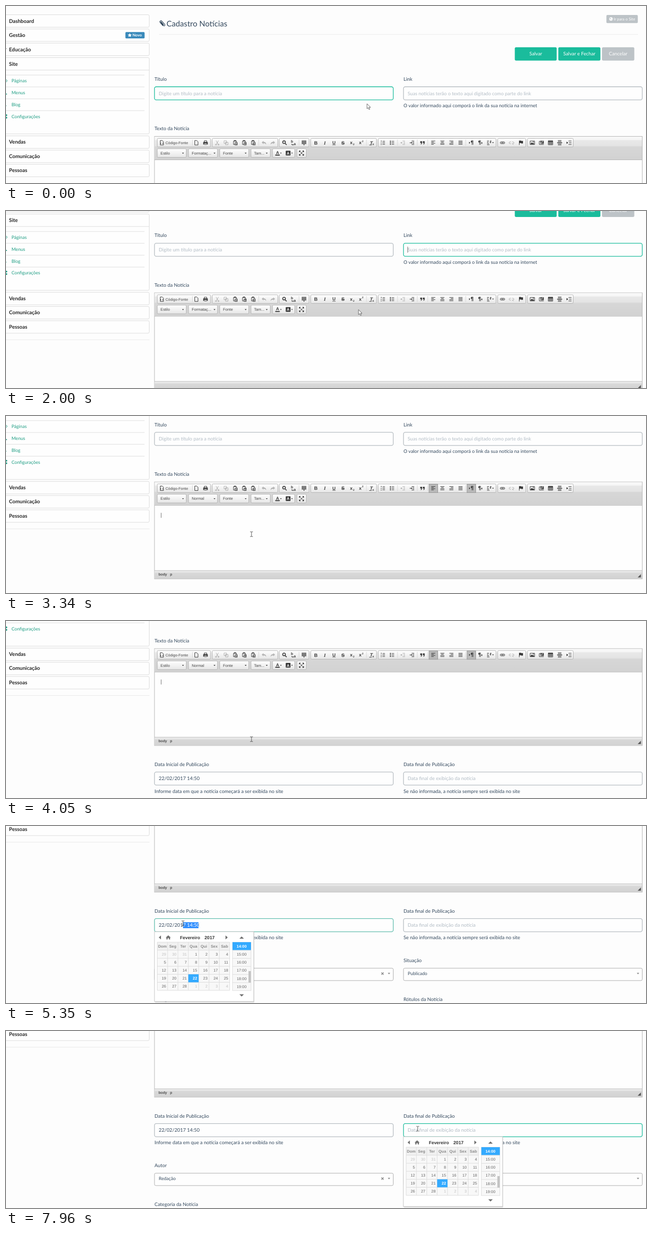
An HTML page that plays this animation: 1280 px wide and 355 px high, repeating every 8 s.

```html
<!DOCTYPE html>
<html lang="pt-BR">
<head>
<meta charset="utf-8">
<title>Cadastro Notícias</title>
<style>
  html, body { margin: 0; width: 100%; height: 100%; overflow: hidden; background: #fdfdfd; }
  svg { display: block; width: 1280px; height: 355px; }
  text { font-family: Lato, sans-serif; text-rendering: geometricPrecision; white-space: pre; }
  .ui { font-family: "Liberation Sans", Arial, sans-serif; }
  .b { font-weight: 700; }
  .ic { fill: none; stroke: #3a3a3a; stroke-width: 1; }
  .heavy { stroke-width: 1.6; }
  .off { opacity: .35; }
</style>
</head>
<body>
<svg id="stage" viewBox="0 0 1280 355" xmlns="http://www.w3.org/2000/svg"></svg>
<script>
const LOOP = 8000, INK = '#34495e', GREEN = '#1abc9c', GREY = '#bdc3c7', SCROLL_END = 323.3;

// ---------- drawing helpers ----------
const rect = (x, y, x2, y2, fill, more = '') =>
  `<rect x="${x}" y="${y}" width="${x2 - x}" height="${y2 - y}" fill="${fill}" ${more}/>`;
const path = (d, more = '') => `<path d="${d}" ${more}/>`;
const line = (x, y, x2, y2, color) => path(`M${x} ${y}L${x2} ${y2}`, `fill="none" stroke="${color}"`);
// y is the middle of the capitals
const text = (x, y, s, size = 9.75, fill = INK, more = '') =>
  `<text x="${x}" y="${y + size * .355}" font-size="${size}" fill="${fill}" ${more}>${s}</text>`;
const mid = 'text-anchor="middle"';
const group = (body, more = '') => `<g ${more}>${body}</g>`;
const tri = (x, y, w, h, fill) => path(`M${x - w} ${y - h}h${2 * w}l${-w} ${2 * h}z`, `fill="${fill}"`);

// ---------- sidebar ----------
function sidebar() {
  let s = '';
  const panel = (y, y2) => rect(-10, y, 286.5, y2, '#fefefe', 'rx="2.5" stroke="#dcdcdc"');
  const head = (y, label) => text(6, y, label, 10.35, '#262626', 'class="b"');
  ['Dashboard', 'Gestão', 'Educação'].forEach((l, i) => {
    s += panel(17.5 + i * 28.5, 42.5 + i * 28.5) + head(30 + i * 28.6, l);
  });
  s += rect(238.8, 52.2, 277.2, 65, '#3a8abb', 'rx="1.8"')
    + path('M247.5 54.4l1.2 2.7 2.9.3-2.2 1.9.7 2.9-2.6-1.5-2.6 1.5.7-2.9-2.2-1.9 2.9-.3z', 'fill="#fff"')
    + text(253, 58.7, 'Novo', 7.76, '#fff', 'class="b"');
  s += panel(103.5, 256.5) + line(0, 128.5, 286, 128.5, '#dcdcdc') + head(116, 'Site');
  ['Páginas', 'Menus', 'Blog', 'Configurações'].forEach((l, i) => {
    s += line(0, 138.5 + i * 23.8, 277, 138.5 + i * 23.8, '#dedede')
      + text(11, 150.2 + i * 23.8, l, 9.15, '#1c9c82');
  });
  s += path('M0 147.5l2.6 2.5L0 152.5M0 175.5l2 1.5H0M0 200h1', 'fill="none" stroke="#1c9c82"')
    + '<g fill="#1c9c82"><circle cx=".8" cy="219" r="1.7"/><circle cx=".8" cy="224" r="1.7"/></g>'
    + line(0, 86, 1, 85, '#555');
  ['Vendas', 'Comunicação', 'Pessoas'].forEach((l, i) => {
    s += panel(260.5 + i * 28.5, 285.5 + i * 28.5) + head(272.5 + i * 28.5, l);
  });
  return s + line(0, 355.7, 287, 355.7, '#e8e8e8');
}

// ---------- page header and form ----------
function header() {
  const button = (x, x2, label, fill) =>
    rect(x, 82.7, x2, 109.4, fill, 'rx="2.6"') + text((x + x2) / 2, 96, label, 9.75, '#fff', mid);
  return path('M309.5 33l5.2 6.2c1.6 1.7 4.2-.3 2.8-2.3l-5.7-6.6c-2-2-5.2.4-3.7 2.7l5.4 6.3M310 31.5l5 6',
      `fill="none" stroke="${INK}" stroke-width="1.2" stroke-linecap="round"`)
    + text(321, 35.2, 'Cadastro Notícias', 15.7)
    + line(306, 57, 1264, 57, '#ececec')
    + rect(1200.8, 18, 1263.6, 34.3, GREY, 'rx="2"')
    + '<circle cx="1210" cy="26" r="3.5" fill="#fff"/>'
    + path('M1207.5 25l2-1 .5 1.5-1 1.5zM1211 26.5l1.5-.5-.5 2z', `fill="${GREY}"`)
    + text(1215.3, 26.2, 'Ir para o Site', 7.8, '#fff')
    + button(1017.6, 1101.4, 'Salvar', GREEN) + button(1104.6, 1188.8, 'Salvar e Fechar', GREEN)
    + button(1192, 1256.6, 'Cancelar', GREY);
}

const field = (id, x, y, h = 26.4) =>
  rect(x, y, x + 477.5, y + h, '#fefefe', `id="${id}" rx="3.6" stroke="#b5bcc1" stroke-width="1.3"`);
const hint = (x, y, s, size) => text(x, y, s, size, '#b2bcc5');
const L = 297, R = 795;

function form() {
  const select = (x, label) =>
    rect(x, 608.5, x + 477.5, 633.3, '#fefefe', 'rx="2.6" stroke="#adadad"')
    + text(x + 8.5, 619, label, 9.1) + tri(x + 469, 619.3, 2.4, 1.4, '#888');
  return text(L, 146.5, 'Título') + field('title', L, 162)
    + hint(305.5, 175.2, 'Digite um título para a notícia')
    + text(R, 146.5, 'Link') + field('link', R, 162)
    + hint(803.3, 175.2, 'Suas notícias terão o texto aqui digitado como parte do link', 9.52)
    + text(R, 200, 'O valor informado aqui comporá o link da sua notícia na internet', 9.52)
    + text(L, 246, 'Texto da Notícia')
    + text(L, 494, 'Data Inicial de Publicação') + field('start', L, 509)
    + text(305.5, 522.1, '22/02/2017 14:50')
    + text(L, 547.3, 'Informe data em que a notícia começará a ser exibida no site')
    + text(R, 494, 'Data final de Publicação') + field('end', R, 509)
    + hint(803.3, 522.1, 'Data final de exibição da notícia')
    + text(R, 547.3, 'Se não informada, a notícia sempre será exibida no site')
    + text(L, 593, 'Autor') + select(L, 'Redação')
    + path('M750.7 617l4.6 4.6m0-4.6l-4.6 4.6', 'stroke="#888" stroke-width="1.5"')
    + text(R, 593, 'Situação') + select(R, 'Publicado')
    + text(L, 671.2, 'Categoria da Notícia') + text(R, 671.2, 'Rótulos da Notícia');
}

// ---------- rich text editor ----------
function editor() {
  const edge = 'stroke="#b6b6b6"', face = 'url(#face)', dark = '#3a3a3a';
  let s = rect(297, 261.5, 1272.5, 456, '#fefefe', edge)
    + rect(297.5, 262, 1272, 308, 'url(#bar)') + line(297, 308.5, 1272.5, 308.5, '#b6b6b6')
    + rect(297.5, 440, 1272, 455.5, 'url(#foot)') + line(297, 439.3, 1272.5, 439.3, '#b6b6b6')
    + path('M1269.8 446.5v6.5h-6.5z', 'fill="#555"');
  const box = (x, x2, y) => rect(x, y, x2, y + 17.3, face, 'rx="2" stroke="#b0b0b0" stroke-width=".9"');
  [[302.5, 409], [412.5, 543.5], [546.5, 606], [609.5, 741], [744.5, 980], [983.5, 1039.5], [1043, 1134.5]]
    .forEach(g => s += box(...g, 265.5));
  [[302.5, 360.5], [365, 423], [427.5, 485.5], [490, 528.5], [533, 577.5], [582, 600.5]]
    .forEach(g => s += box(...g, 286.3));
  [373, 505.5, 586, 721, 783, 822.5, 843.5, 919.5].forEach(x => s += line(x, 268, x, 280, '#d8d8d8'));
  const press = x => rect(x, 266, x + 17.5, 283, '#b9b9b9', 'stroke="#8a8a8a" stroke-width=".8"');
  s += group(press(846) + press(922), 'id="pressed"');

  // stroked icon around (x, y); the optional second path is filled
  const icon = (x, d, solid = '', cls = '', y = 274.3) =>
    group(path(d) + (solid && path(solid, `fill="${dark}" stroke="none"`)),
      `class="ic ${cls}" transform="translate(${x} ${y})"`);
  const glyph = (x, c, more = '', size = 9.6, y = 274.3) =>
    text(x, y, c, size, dark, `class="ui b" ${mid} ${more}`);
  const sheet = 'M-3-4.5h4l2.5 2.5v6.5h-6.5z';
  const clip = 'M-3.5-3.5h6v3M-3.5-3.5v7h3M-.5-.5h4.5v5h-4.5z';
  const clipTop = 'M-2.5-5h4v2h-4z';
  const rows = 'M-4-3.5h8M-4 3.2h';
  const listing = 'M-1-3h5M-1 0h5M-1 3h5';
  const indent = 'M-1-3.5h5M1-1.2h3M1 1.2h3M-1 3.5h5M-5 0h4';
  const pilcrow = 'M0-4h4M1.5-4v8M3.5-4v8';
  s += icon(311.5, sheet + 'M-1.5 0l-1 1.3 1 1.3M1.5 0l1 1.3-1 1.3')
    + text(319, 274.5, 'Código-Fonte', 7.45, '#474747', 'class="ui"')
    + icon(380.5, sheet)
    + icon(399, 'M-2.5-4h5v3M-2.5-4v3M-2.5 3.5h5', 'M-4.5-1.5h9v5h-2v-2h-5v2h-2z')
    + icon(422.5, 'M-2.5-4.5l4 7M2.5-4.5l-4 7M-3.5 3a1.2 1.2 0 1 0 2 0zM1.5 3a1.2 1.2 0 1 0 2 0z', '', 'off')
    + icon(440, 'M-4-4h5v5h-5zM-1-1h5v5h-5z', '', 'off')
    + icon(458.5, clip + 'M1 1.5h2M1 3h2', clipTop)
    + icon(476.5, clip + 'M.5 1h3M2 1v3', clipTop)
    + icon(494.5, clip + 'M.5 1l1 2.5 1-2.5', clipTop)
    + icon(516, '', 'M-4.5-.5l3.5-3.2v2q5 0 5.5 5.200-2-2.800-5.5-2.800v2z', 'off')
    + icon(533.5, '', 'M4.5-.5l-3.5-3.2v2q-5 0-5.500 5.200 2-2.800 5.500-2.800v2z', 'off')
    + icon(557, 'M1.8-1.2a2.7 2.7 0 1 0-5.4 0a2.7 2.7 0 1 0 5.4 0M1 1l3.3 3.3', '', 'heavy')
    + glyph(572, 'b', '', 7.2, 271.8) + glyph(577.5, 'a', '', 7.2, 276.6)
    + icon(575, 'M-3.5 2.2v1.8h2.5', 'M-1.3 2.4l1.8 1.6-1.8 1.6z')
    + icon(596, 'M-4.5-4h9M-4.5-2h9M-4.5 0h9M-4.5 2h9M-1 4h2M-3.5-4v6M0-4v9M3.5-4v6')
    + glyph(619.7, 'B') + glyph(637.7, 'I', 'font-style="italic" style="font-family:Liberation Serif,serif"')
    + glyph(656, 'U', 'text-decoration="underline"', 8.8, 273.8) + glyph(674, 'S', 'text-decoration="line-through"')
    + glyph(690.5, 'x', '', 9) + glyph(695.3, '2', '', 5, 277.5)
    + glyph(708.5, 'x', '', 9) + glyph(713.3, '2', '', 5, 271)
    + glyph(730.5, 'T', 'font-style="italic"', 9.4) + glyph(734.5, 'x', '', 6, 277)
    + icon(730, 'M-3.5 4.5h5')
    + icon(754, listing + 'M-3.5-4.5v2.5M-4.5.5h2M-4.5 3.5h2')
    + icon(772.3, listing, 'M-4.5-4h2v2h-2zM-4.5-1h2v2h-2zM-4.5 2h2v2h-2z')
    + icon(794, indent, 'M-5 0l2.5-2v4z', 'off')
    + icon(812.3, indent, 'M.5 0l-2.5-2v4z')
    + icon(833, '', 'M-4.5-3h3.7v3.5q0 2.5-2.7 3v-1q1.2-.7 1.2-2h-2.2zM.7-3h3.7v3.5q0 2.5-2.7 3v-1q1.2-.7 1.2-2h-2.2z')
    + icon(854.5, rows + '5M-4-1.3h5M-4 .9h8')
    + icon(872.7, rows + '8M-2.5-1.3h5M-4 .9h8')
    + icon(890.7, rows + '8M-1-1.3h5M-4 .9h8')
    + icon(909, rows + '8M-4-1.3h8M-4 .9h8')
    + icon(930.5, pilcrow, 'M-4.5-2l2.5 2-2.5 2zM2-4.3h-1q-2 .3-2 2t2 2h1z')
    + icon(947.5, 'M-2-4h4M-.5-4v8M1.5-4v8', 'M5-1.5l-2.5 2 2.5 2zM0-4.3h-1q-2 .3-2 2t2 2h1z')
    + icon(966, 'M-4-3.5h4M-4-1h3M-4 1.5h4M-4 4h5M2-3.5h3M1.5-1h3M3-4v5')
    + tri(974, 274.3, 1.8, 1, dark)
    + icon(993, 'M0-1.8h-2.7a1.8 1.8 0 0 0 0 3.6h2.7M0-1.8h2.7a1.8 1.8 0 0 1 0 3.6h-2.7M-2.5 0h5')
    + icon(1011, 'M-1-1.8h-2a1.8 1.8 0 0 0 0 3.6h2M1-1.8h2a1.8 1.8 0 0 1 0 3.6h-2M2 2l2 2', '', 'off')
    + icon(1030, 'M-3.5-4.5v9', 'M-3-4q2-1 3.5 0t3.5 0v5q-2 1-3.5 0t-3.5 0z')
    + icon(1052.7, 'M-4.5-3.5h9v7h-9z', 'M-4 3l2.5-4 2 2 1.5-1 2 3zM1-2.5h2v1.5h-2z')
    + icon(1071, 'M-4.5-3h4M-4.5 3.5h9M-4.5-3v6', 'M-2-4h6.5v6h-6.5z')
    + path('M1074 271.5h-2q-1 0-1 4.5m0-2.3h2', 'fill="none" stroke="#eee" stroke-width=".9"')
    + icon(1089, 'M-4.5-4h9v8h-9zM-4.5-1h9M-4.5 1.5h9M-1.5-3v7M1.5-3v7', 'M-4.5-4h9v2h-9z')
    + icon(1107.3, 'M-3.5-4.5h7M-3.5-2.5h7M-3.5 2.5h7M-3.5 4.5h7', 'M-5-.8h10v1.6h-10z')
    + icon(1126, 'M-1-3.5h6M-1 3.5h6M0 0h5', 'M-5-2.3l3.5 2.3-3.5 2.3z');
  [[309, 'Estilo', 354], [371.5, 'Formataç...', 417], [434, 'Fonte', 479.3], [496, 'Tam...', 521.5]]
    .forEach(([x, l, a], i) => s += text(x, 295, l, 7.7, '#474747', `class="ui" ${i == 1 ? 'id="format"' : ''}`)
      + tri(a, 295.3, 1.9, 1.1, dark));
  s += glyph(543, 'A', '', 8.6, 293.8) + rect(538.5, 298, 547.5, 300, dark) + tri(549.8, 295.3, 1.6, 1, dark)
    + rect(559.5, 290.3, 569, 299.8, dark, 'rx="1"') + text(564.3, 295, 'A', 7.6, '#fff', `class="ui b" ${mid}`)
    + tri(572, 295.3, 1.6, 1, dark)
    + icon(591, 'M-3.5-3.5l7 7M3.5-3.5l-7 7', 'M-5-5h3.8l-3.8 3.8zM5-5v3.8l-3.8-3.8zM5 5h-3.8l3.8-3.8zM-5 5v-3.8l3.8 3.8z', '', 295);
  return s + group(text(305, 447, 'body', 7.1, '#4c4c4c', 'class="ui b"')
    + text(328, 447, 'p', 7.1, '#4c4c4c', 'class="ui b"'), 'id="crumbs"');
}

// ---------- date picker ----------
function calendar() {
  const x0 = 302.5, w = 20.7, y0 = 233, h = 16.1, grid = '#dddddd', blue = '#33aaff', arrow = '#707070';
  const ui = 'class="ui"', bold = 'class="ui b"';
  let s = rect(298, 213, 496.5, 354, '#000', 'opacity=".13" rx="1"')
    + rect(297, 212, 495.5, 352, '#fff', 'stroke="#c4c4c4"')
    + path('M310 219.5v8l-4.5-4zM439 219.5v8l4.5-4z', `fill="${arrow}"`)
    + path('M324.5 219.3l5 4.5h-1.3v3.7h-2.5v-2.7h-2.4v2.7h-2.5v-3.7h-1.3z', `fill="${arrow}"`)
    + text(348, 223.5, 'Fevereiro', 8.95, '#333', bold) + text(397, 223.5, '2017', 9.2, '#333', bold)
    + rect(x0, y0, x0 + 7 * w, y0 + 6 * h, '#f8f8f8') + rect(x0, y0, x0 + 7 * w, y0 + h, '#f1f1f1');
  for (let i = 0; i <= 7; i++) {
    s += line(x0 + i * w, y0, x0 + i * w, y0 + 6 * h, grid);
    if (i < 7) s += line(x0, y0 + i * h, x0 + 7 * w, y0 + i * h, grid);
  }
  s += rect(x0 + 3 * w, y0 + 4 * h, x0 + 4 * w, y0 + 5 * h, blue);
  'Dom Seg Ter Qua Qui Sex Sab'.split(' ').forEach((d, i) =>
    s += text(x0 + (i + .5) * w, y0 + h / 2, d, 7.8, '#8a8a8a', `${bold} ${mid}`));
  for (let i = 0; i < 35; i++) {
    const day = i < 3 ? 29 + i : i < 31 ? i - 2 : i - 30, now = i == 24;
    s += text(x0 + (i % 7 + 1) * w - 3, y0 + (Math.floor(i / 7) + 1.5) * h, day, 7.8,
      now ? '#fff' : i < 3 || i > 30 ? '#c2c2c2' : '#666', `class="ui ${now ? 'b' : ''}" text-anchor="end"`);
  }
  s += rect(453, y0, 490, 330, '#f8f8f8', `stroke="${grid}"`) + rect(453, y0, 490, y0 + h, blue);
  for (let i = 0; i < 6; i++) {
    s += text(471.3, y0 + 8 + i * 16.2, 14 + i + ':00', 7.8, i ? '#666' : '#fff', `${i ? ui : bold} ${mid}`);
    if (i) s += line(453, y0 + i * 16.2, 490, y0 + i * 16.2, grid);
  }
  return s + rect(485, 291, 489.8, 314, '#c4c4c4')
    + tri(471.3, 223.8, 4.5, -2.2, arrow) + tri(471.3, 339.7, 4.5, 2.2, arrow);
}

// ---------- assemble ----------
const grad = (id, ...stops) => `<linearGradient id="${id}" x2="0" y2="1">`
  + stops.map(([o, c]) => `<stop offset="${o}" stop-color="${c}"/>`).join('') + '</linearGradient>';
const caret = (id, x, y, y2) => rect(x, y, x + 1, y2, '#707070', `id="${id}"`);
const selection = group(rect(305, 193, 385, 205, '#3390ff')
  + text(305.5, 198.8, '22/02/2017 14:50', 9.75, '#fff'), 'id="selection" clip-path="url(#drag)"');

document.getElementById('stage').innerHTML = '<defs>'
  + grad('bar', [0, '#f9f9f9'], [.13, '#f6f6f6'], [.17, '#e8e8e8'], [.4, '#e4e4e4'], [.44, '#d7d7d7'], [1, '#d2d2d2'])
  + grad('foot', [0, '#ececec'], [.22, '#e4e4e4'], [.26, '#d8d8d8'], [1, '#d3d3d3'])
  + grad('face', [0, '#ffffff'], [1, '#e6e6e6'])
  + '<clipPath id="drag"><rect id="dragBox" y="190" width="90" height="20"/></clipPath></defs>'
  + group(sidebar() + header() + form() + editor()
    + caret('linkCaret', 803, 169, 181) + caret('textCaret', 309.8, 323.5, 333.5)
    + caret('endCaret', 803, 516.3, 528.5), 'id="page"')
  + selection + group(calendar(), 'id="calendar"')
  + path('M0 0v10l2.3-2.1 1.7 3.8 1.7-.8-1.7-3.6h3.1z', 'id="arrow" fill="#fff" stroke="#444" stroke-width=".8"')
  + path('M-2.8-4.8h2l.8.6.8-.6h2M-2.8 4.8h2l.8-.6.8.6h2M0-4.2v8.4',
    'id="beam" fill="none" stroke="#444" stroke-width=".9"');

const $ = Object.fromEntries([...document.querySelectorAll('[id]')].map(e => [e.id, e]));

const bursts = [[0, 0, 1], [120, 830, 6], [1100, 1100, 1], [1540, 1690, 2], [1840, 2140, 3], [2270, 2550, 3],
  [2670, 3340, 6], [3610, 3610, 1], [4050, 4340, 3], [4480, 5050, 5], [5200, 5480, 3], [5910, 6040, 2],
  [6310, 6310, 1], [6590, 6840, 3], [6980, 7550, 5], [7680, 7680, 1], [7960, 7960, 1]];
const ticks = bursts.flatMap(([a, b, n]) =>
  Array.from({ length: n }, (_, i) => n > 1 ? a + (b - a) * i / (n - 1) : a));
const snap = t => ticks.filter(k => k <= t + 4).pop();

// pointer path: time, x, y, text beam
const route = [[0, 722, 196, 0], [60, 722, 196, 0], [420, 796, 180, 1], [560, 822, 176, 1], [830, 826, 177, 1],
  [1480, 826, 177, 1], [1530, 795, 183, 0], [1690, 705, 197.8, 0], [2200, 705, 197.8, 0], [2420, 690, 202, 1],
  [3000, 491, 237, 1], [4420, 491, 237, 1], [5050, 408, 196, 1], [5200, 400, 195, 1], [5480, 308, 195, 1],
  [5850, 308, 195, 1], [6040, 284, 192, 1], [6300, 281.5, 187, 0], [6500, 281.5, 187, 0], [6580, 305, 195, 1],
  [6840, 639, 203.5, 1], [7120, 760, 203, 1], [7410, 823.5, 196, 1], [LOOP, 823.5, 196, 1]];
const CLICK = { link: 570, text: 3080, start: 5200, end: 7430 };

const clamp = v => Math.max(0, Math.min(1, v));
const ease = (t, a, b) => { const p = clamp((t - a) / (b - a)); return p * p * (3 - 2 * p); };
const show = (el, on) => el.setAttribute('visibility', on ? 'visible' : 'hidden');
const within = (t, ...spans) => spans.some(([a, b]) => t >= a && t < b);

function focus(el, t, from, to) {
  const k = clamp((t - from) / 250) - clamp((t - to) / 250);
  const mix = (a, b) => Math.round(a + (b - a) * k);
  el.setAttribute('stroke', `rgb(${mix(181, 26)},${mix(188, 188)},${mix(193, 156)})`);
}

function pointer(t) {
  const i = Math.max(1, route.findIndex(k => k[0] > t)), a = route[i - 1], b = route[i];
  const p = (t - a[0]) / (b[0] - a[0]);
  return { x: a[1] + (b[1] - a[1]) * p, y: a[2] + (b[2] - a[2]) * p, beam: a[3] };
}

function draw(t) {
  const scroll = 129.3 * ease(t, 1760, 2100) + (SCROLL_END - 129.3) * ease(t, 3951, 4181);
  $.page.setAttribute('transform', `translate(0 ${-scroll})`);

  focus($.title, t, -250, CLICK.link);
  focus($.link, t, CLICK.link, CLICK.text);
  focus($.start, t, CLICK.start, CLICK.end);
  focus($.end, t, CLICK.end, 2 * LOOP);
  show($.linkCaret, within(t, [CLICK.link, 1095], [1535, 2110], [2640, CLICK.text]));
  show($.textCaret, within(t, [CLICK.text, 3605], [4045, 4670]));
  show($.endCaret, within(t, [CLICK.end, 7955]));

  const editing = t >= CLICK.text;
  show($.pressed, editing);
  show($.crumbs, editing);
  $.format.textContent = editing ? 'Normal' : 'Formataç...';

  const m = pointer(t), mark = m.beam ? $.beam : $.arrow;
  show($.beam, m.beam);
  show($.arrow, !m.beam);
  mark.setAttribute('transform', `translate(${m.x} ${m.y})`);

  show($.selection, within(t, [CLICK.start + 50, CLICK.end]));
  $.dragBox.setAttribute('x', t < 5480 ? Math.max(305, Math.min(385, m.x)) : 305);
  show($.calendar, t >= CLICK.start);
  $.calendar.setAttribute('transform', `translate(${t < CLICK.end ? 0 : 497.7} 0)`);
}

function frame() {
  draw(snap(performance.now() % LOOP));
  requestAnimationFrame(frame);
}
frame();
</script>
</body>
</html>
```
